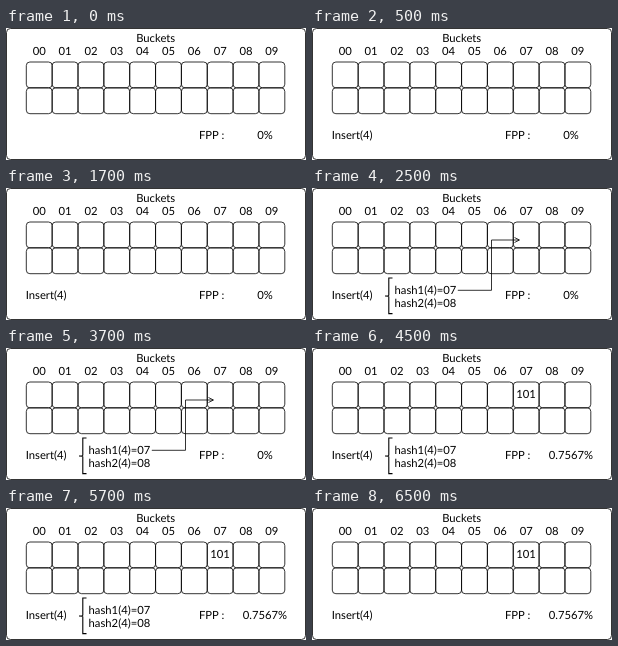
An HTML page that plays this animation: 300 px wide and 132 px high, repeating every 8 s.

```html
<!DOCTYPE html>
<html lang="en">
<head>
<meta charset="utf-8">
<title>Bucket insert</title>
<style>
  html, body { margin: 0; width: 100%; height: 100%; overflow: hidden; background: #fff; }
  svg { display: block; width: 100vw; height: 100vh; }
  text { font: 11.25px Lato, "Open Sans", sans-serif; fill: #000; text-rendering: geometricPrecision; }
  .mid { text-anchor: middle; }
  .line { fill: none; stroke: #000; stroke-width: 0.8; }
  .bold { stroke-width: 1.1; }
</style>
</head>
<body>
<svg id="stage" viewBox="0 0 300 132">
  <rect class="line" x="0.5" y="0.5" width="299" height="131" rx="4"/>
  <text class="mid" x="149.7" y="14">Buckets</text>
  <g id="grid"></g>
  <text x="193" y="111.2">FPP :</text>
  <text id="rate" class="mid" x="259" y="111.2">0%</text>
  <text id="call" x="19.7" y="111.2">Insert(4)</text>
  <g id="hashes">
    <path class="line bold" d="M80.5 90H76.8V107.2Q76.8 108 73 108Q76.8 108 76.8 108.8V125.6H80.5"/>
    <text x="82.6" y="106">hash1(4)=07</text>
    <text x="82.6" y="118.7">hash2(4)=08</text>
  </g>
  <g id="arrow">
    <path class="line" d="M145.8 102.3H179.5V52H207"/>
    <path class="line" d="M202.5 49.5L207.5 52L202.5 54.5"/>
  </g>
  <text id="stored" class="mid" x="214" y="50">101</text>
</svg>
<script>
  const LOOP = 8000;
  const LEFT = 20.3, TOP = 34, PITCH = 25.85, ROW = 25.85;
  const $ = id => document.getElementById(id);

  function add(tag, attrs, text = "") {
    const el = document.createElementNS("http://www.w3.org/2000/svg", tag);
    for (const key in attrs) el.setAttribute(key, attrs[key]);
    el.textContent = text;
    $("grid").append(el);
  }

  for (let col = 0; col < 10; col++) {
    const x = LEFT + col * PITCH;
    add("text", { class: "mid", x: x + PITCH / 2, y: 27.2 }, "0" + col);
    for (let row = 0; row < 2; row++) {
      add("rect", { class: "line", x, y: TOP + row * ROW, width: PITCH, height: ROW, rx: 3.6 });
    }
  }

  function show(id, on) {
    $(id).setAttribute("visibility", on ? "visible" : "hidden");
  }

  function draw(t) {
    const stored = t >= 4500;
    show("call", t >= 500);
    show("hashes", t >= 2500 && t < 6500);
    show("arrow", t >= 2500 && !stored);
    show("stored", stored);
    $("rate").textContent = stored ? "0.7567%" : "0%";
  }

  const start = performance.now();
  function tick() {
    draw((performance.now() - start) % LOOP);
    requestAnimationFrame(tick);
  }
  tick();
</script>
</body>
</html>
```
